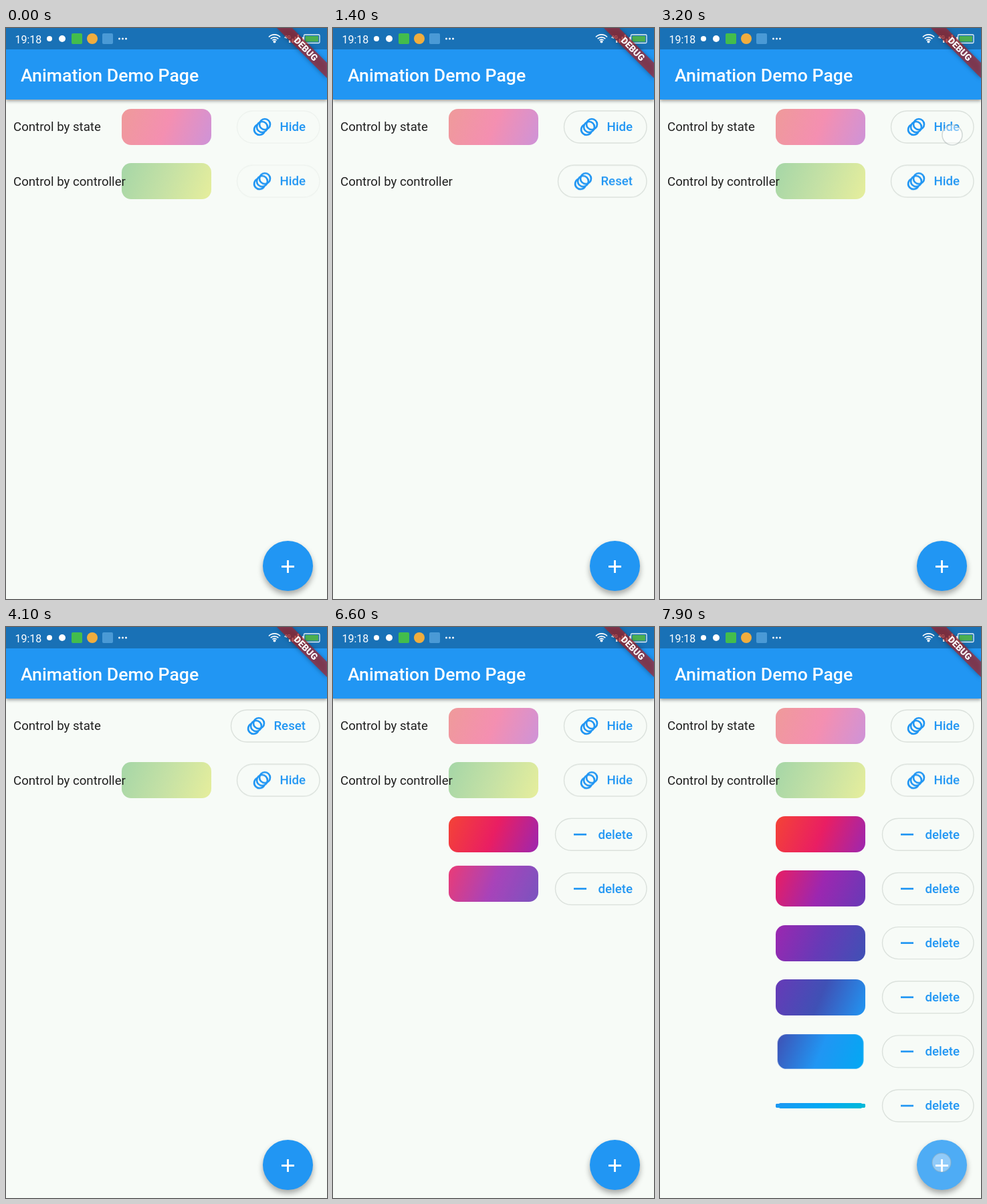
Write an HTML page that moves like this. It is 480 px wide and 854 px high and loops after 8000 ms.

```html
<!DOCTYPE html>
<html lang="en">
<head>
<meta charset="utf-8">
<title>Animation Demo Page</title>
<style>
  html, body { margin: 0; width: 100%; height: 100%; overflow: hidden; background: #f7fbf7; }
  #stage { position: absolute; left: 0; top: 0; width: 480px; height: 854px; overflow: hidden; background: #f7fbf7; }
  svg { position: absolute; left: 0; top: 0; font-family: Roboto, sans-serif; }
  .box { position: absolute; left: 173px; width: 134px; height: 54px; border-radius: 14px; }
  .label { font-size: 18.67px; fill: #202020; }
  .action { font-size: 18.67px; font-weight: 500; fill: #2196f3; text-anchor: end; }
  .pill { fill: none; stroke: #dbe1dc; stroke-width: 1.4; }
  .glow { fill: rgba(33,150,243,.13); opacity: 0; }
  .icon { fill: none; stroke: #2196f3; stroke-width: 2; }
  .touch { fill: rgba(255,255,255,.45); stroke: rgba(160,170,170,.45); stroke-width: 1.5; opacity: 0; }
  #bar { position: absolute; width: 480px; height: 107px; background: linear-gradient(#1971b6 32px, #2196f3 32px); box-shadow: 0 2px 5px rgba(0,0,0,.4); }
  #fab { position: absolute; left: 384px; top: 767px; width: 75px; height: 75px; border-radius: 50%; background: #2196f3; box-shadow: 0 5px 8px rgba(0,0,0,.33); }
</style>
</head>
<body>
<div id="stage">
  <div id="boxes"></div>
  <svg id="rows" width="480" height="854">
    <defs>
      <g id="rings" class="icon" transform="scale(1.333) translate(-12 -12)">
        <path d="M6.5 9.5A6 6 0 1 0 14.5 17.5"/>
        <circle cx="12" cy="12" r="6"/><circle cx="15" cy="9" r="6"/>
      </g>
    </defs>
    <text class="label" x="11" y="154">Control by state</text>
    <text class="label" x="11" y="235.5">Control by controller</text>
  </svg>
  <div id="bar"></div>
  <div id="fab"></div>
  <svg id="top" width="480" height="854">
    <g fill="#fff">
      <text x="22" y="80" font-size="26.67" font-weight="500">Animation Demo Page</text>
      <text x="13.5" y="22.5" font-size="16">19:18</text>
      <circle cx="65" cy="16" r="4"/>
      <circle cx="84" cy="16" r="5"/>
      <circle cx="169.5" cy="16" r="1.5"/><circle cx="174.5" cy="16" r="1.5"/><circle cx="179.5" cy="16" r="1.5"/>
      <text x="416" y="15.5" font-size="8" font-weight="700">4G</text>
      <path d="M423 18h2.5v4h-2.5zM427.500 16h2.5v6h-2.5zM431.500 13h2.5v9h-2.5zM435.500 10h2.5v12h-2.5z"/>
      <circle cx="401.5" cy="20.5" r="2"/>
      <path d="M393 13.5a12 12 0 0 1 17 0M395.700 16.200a8.200 8.200 0 0 1 11.600 0M398.300 18.500a4.500 4.500 0 0 1 6.400 0" fill="none" stroke="#fff" stroke-width="1.7"/>
      <path d="M443 13.5h2v5h-2z"/>
      <rect x="445.5" y="10" width="23.5" height="12.5" rx="1.5" fill="none" stroke="#e6f2f4" stroke-width="1.3"/>
      <rect x="447.5" y="12" width="19.5" height="8.5" fill="#4caf50"/>
    </g>
    <rect x="98" y="8" width="16" height="16" rx="2" fill="#43bd4c"/>
    <circle cx="129" cy="16" r="8" fill="#f0ad3e"/>
    <rect x="144" y="8" width="16" height="16" rx="2" fill="#4a9ad6"/>
    <path d="M421.500 796v19M412 805.500h19" stroke="#fff" stroke-width="2.9"/>
    <path d="M405 0H428L480 52V75Z" fill="rgba(183,28,28,.63)" style="filter: drop-shadow(0 1px 3px rgba(0,0,0,.5))"/>
    <text transform="translate(448.5 31.5) rotate(45)" y="4.8" text-anchor="middle" font-size="13.6" font-weight="900" fill="#fff">DEBUG</text>
  </svg>
</div>
<script>
const LOOP = 8000, SPAN = 500, PITCH = 81.15;
const $ = id => document.getElementById(id);
const rowY = i => 148 + PITCH * i;

// Adds an SVG element to a parent.
function add(parent, tag, attrs, text = '') {
  const el = document.createElementNS('http://www.w3.org/2000/svg', tag);
  for (const k in attrs) el.setAttribute(k, attrs[k]);
  el.textContent = text;
  parent.append(el);
  return el;
}

// Plays steps of [ms, style, easing to next] on the shared loop.
function play(el, steps) {
  const frames = [...steps], first = steps[0], last = steps[steps.length - 1];
  if (first[0] > 0) frames.unshift([0, first[1]]);
  if (last[0] < LOOP) frames.push([LOOP, last[1]]);
  el.animate(frames.map(([ms, style, easing = 'linear']) =>
    ({ ...style, easing, offset: ms / LOOP })),
    { duration: LOOP, iterations: Infinity });
}

// Shows an element only within the given [from, to] times.
function showDuring(el, ranges, fade = 0) {
  const steps = [];
  for (const [from, to] of ranges) {
    if (from > 0) steps.push([from, { opacity: 0 }]);
    steps.push([from, { opacity: 1 }]);
    if (to < LOOP) steps.push([to - fade, { opacity: 1 }], [to, { opacity: 0 }]);
  }
  play(el, steps);
}

const rest = { transform: 'none', opacity: 1 };
const effects = {
  flip: [{ transform: 'rotateX(90deg)', opacity: 1 }, { transform: 'rotateX(0deg)', opacity: 1 }, 'linear'],
  scale: [{ transform: 'scale(0)', opacity: 1 }, rest, 'ease-out'],
  slide: [{ transform: 'translateY(-54px)', opacity: 0 }, rest, 'cubic-bezier(.215,.61,.355,1)'],
  fade: [{ transform: 'none', opacity: 0 }, rest, 'linear']
};

function makeBox(row, colors) {
  const el = document.createElement('div');
  el.className = 'box';
  el.style.top = rowY(row) - 27 + 'px';
  el.style.background = `linear-gradient(112deg, ${colors})`;
  $('boxes').append(el);
  return el;
}

function makeButton(row, text, left) {
  const g = add($('rows'), 'g', { transform: `translate(0 ${rowY(row)})` });
  const shape = { x: left, y: -24, width: 469 - left, height: 48, rx: 24 };
  g.glow = add(g, 'rect', { class: 'glow', ...shape });
  g.pill = add(g, 'rect', { class: 'pill', ...shape });
  if (text === 'delete') add(g, 'path', { class: 'icon', d: 'M360 0h19', style: 'stroke-width: 2.7' });
  else add(g, 'use', { href: '#rings', x: left + 37.5 });
  add(g, 'text', { class: 'action', x: 448, y: 6.3 }, text);
  return g;
}

function makeTouch(x, y, r, taps) {
  const el = add($('top'), 'circle', { class: 'touch', cx: x, cy: y, r });
  showDuring(el, taps.map(t => [t - 110, t + 80]), 40);
}

// Rows that hide on the first tap and come back on the second.
function toggleRow(row, colors, effect, hideAt, resetAt, x, y) {
  const [from, to, easing] = effects[effect];
  play(makeBox(row, colors), [
    [hideAt, to, easing], [hideAt + SPAN, from],
    [resetAt, from, easing], [resetAt + SPAN, to]
  ]);
  const hide = makeButton(row, 'Hide', 345.5), reset = makeButton(row, 'Reset', 336.5);
  showDuring(reset, [[hideAt, resetAt]]);
  showDuring(hide, [[0, hideAt], [resetAt, LOOP]]);
  const glow = t => [t - 50, t + SPAN];
  for (const b of [hide, reset]) showDuring(b.glow, [hideAt, resetAt].map(glow), 100);
  play(hide.pill, [[0, { opacity: .3 }], [300, { opacity: 1 }]]);
  makeTouch(x, y, 15, [hideAt, resetAt]);
}

toggleRow(0, '#ef9a9a, #f48fb1, #ce93d8', 'flip', 3300, 4900, 437, 160);
toggleRow(1, '#a5d6a7, #c5e1a5, #e6ee9c', 'fade', 700, 2300, 429, 236);

// Rows added by the round button; each blends three neighbours of the palette.
const palette = ['#f44336', '#e91e63', '#9c27b0', '#673ab7', '#3f51b5', '#2196f3', '#03a9f4', '#00bcd4'];
const entries = ['scale', 'slide', 'flip', 'slide', 'scale', 'flip'];
const taps = entries.map((_, i) => 5980 + 375 * i);

entries.forEach((effect, i) => {
  const t = taps[i], [from, to, easing] = effects[effect];
  const box = makeBox(i + 2, palette.slice(i, i + 3));
  const part = Math.min(1, (LOOP - t) / SPAN);
  const end = part < 1 ? { transform: `rotateX(${90 * (1 - part)}deg)`, opacity: 1 } : to;
  play(box, [[t, { ...from, opacity: 0 }], [t, from, easing], [Math.min(t + SPAN, LOOP), end]]);
  showDuring(makeButton(i + 2, 'delete', 332.5), [[t, LOOP]]);
});

const idle = { background: '#2196f3' }, pressed = { background: '#4eacf5' };
play($('fab'), taps.flatMap(t => [
  [t - 100, idle], [t - 50, pressed], [Math.min(t + 100, LOOP), pressed],
  ...(t + 180 < LOOP ? [[t + 180, idle]] : [])
]));
makeTouch(421, 801, 14, taps);
</script>
</body>
</html>
```
